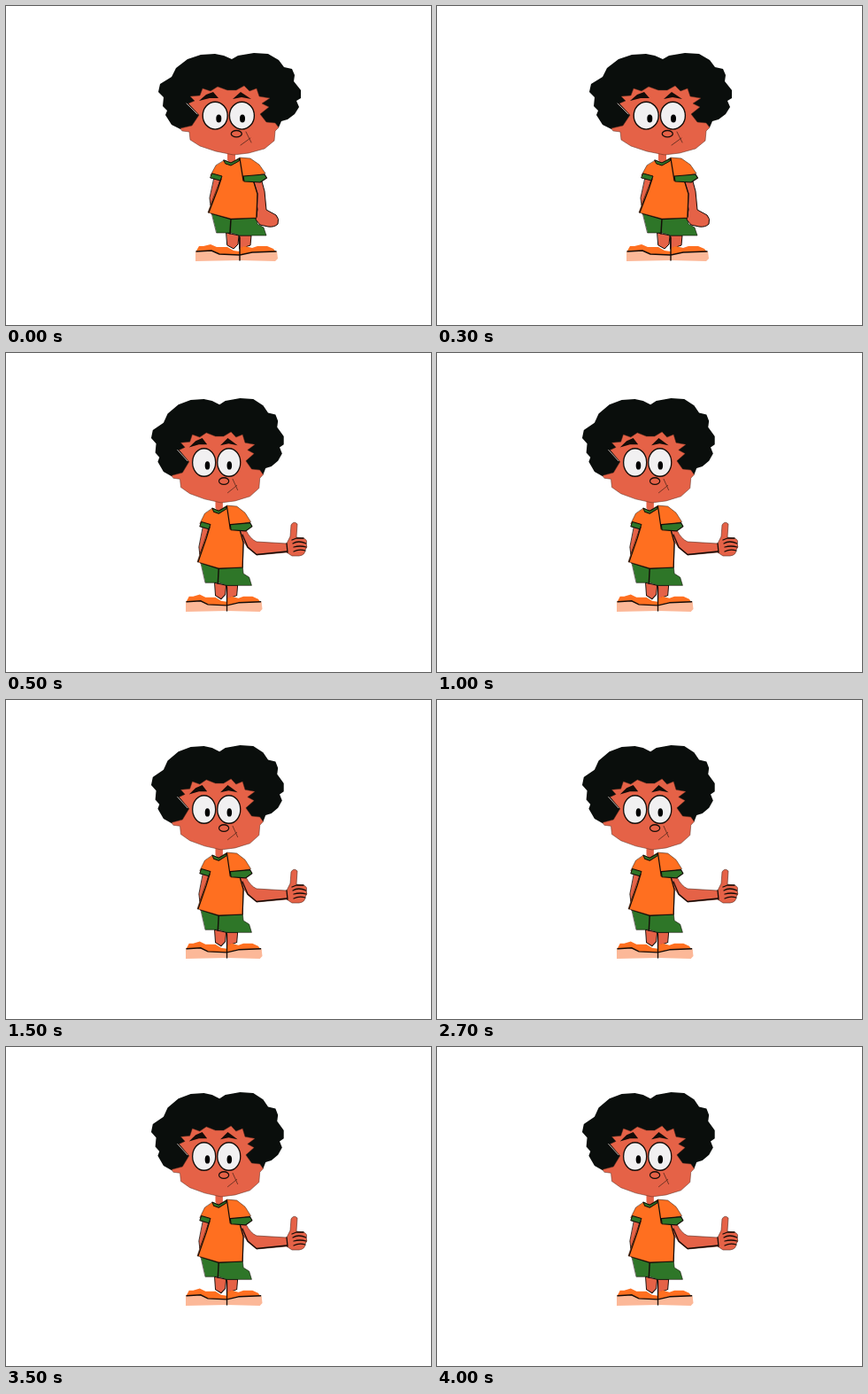
These frames come from a looping animation (480 by 360 pixels, 4500 ms). An HTML page with a canvas:

```html
<!DOCTYPE html>
<html lang="en">
<head>
<meta charset="utf-8">
<title>Thumbs up</title>
<style>
html, body { margin: 0; width: 100%; height: 100%; overflow: hidden; background: #fff; }
canvas { display: block; }
</style>
</head>
<body>
<canvas id="stage" width="480" height="360"></canvas>
<script>
const ctx = document.getElementById('stage').getContext('2d');
const LOOP = 4500, RAISE = 500;
const SKIN = '#e56247', ORANGE = '#ff6f20', GREEN = '#2e7628';
const SOLE = '#fcb898', HAIR = '#0a0e0c', INK = '#140c08', FAINT = '#54281c';

function shape(d, fill, stroke, width = 1) {
  const path = new Path2D(d);
  if (fill) { ctx.fillStyle = fill; ctx.fill(path); }
  if (stroke) { ctx.strokeStyle = stroke; ctx.lineWidth = width; ctx.stroke(path); }
}

function oval(x, y, rx, ry, fill, stroke, width) {
  const path = new Path2D();
  path.ellipse(x, y, rx, ry, 0, 0, 7);
  shape(path, fill, stroke, width);
}

function legs() {
  shape('M249 256L263 259L262 269L257 274L250 270Z', SKIN, INK);
  shape('M264 259H277L276 270L264 274Z', SKIN, INK);
  shape('M214 278L218 271L223 271L231 269L238 272L250 272L257 276L264 277V282L214 280Z', ORANGE);
  shape('M264 273L270 271L278 273L284 271L295 271L302 274L306 279L264 282Z', ORANGE);
  shape('M214 277L232 276L241 280L264 281L278 278L306 277L307 285L304 288L264 287L214 288Z', SOLE);
  shape('M215 277L232 276L241 280L264 281L278 278L305 277M264 261V287', null, INK, 1.4);
  shape('M232 232L254 240L283 238L284 246L291 250L294 259L264 259L254 256L238 256Z', GREEN, INK, .6);
  shape('M254 240L253 257M232 234L254 240.5L283 239', null, INK, 1.5);
}

function armDown() {
  shape('M279 198L289 198L292 209L294 230L305 236Q309 240 307 246Q303 250 296 249L287 247L282 241L284 230Z', SKIN, INK);
}

function armUp() {
  ctx.save();
  ctx.setTransform(1, 0, 0, 1, 0, 0);
  shape('M262 200L271 200Q276 210 283 213L317 215L321 207L322 194Q325 189 329 193L328 208L336 209Q341 211 339 215Q341 219 338 222Q338 228 331 229L323 229L317 225L283 228L273 220L266 209Z', SKIN, FAINT, .6);
  shape('M267 205L273 219L283 227.5L317 224M317 215L318 225M323 211L328 209L336 209M324 215Q330 211 339 215M325 219Q332 217 339 219M325 224Q331 221 338 223', null, INK, 1.3);
  ctx.restore();
}

function shirt() {
  shape('M235 195L242 195L239 206L231 225L230 217Z', SKIN, INK, .8);
  shape('M250 164L259 164L259 174L254 178L250 174Z', SKIN);
  shape('M247 174L254 177L264 171L276 172L286 179L293 189L268 195L280 199L284 212L283 239L254 240L228 233L238 206L243 195L231 191L237 180Z', ORANGE, INK, .5);
  shape('M233 189L244 192L242 197L231 194Z', GREEN, INK);
  shape('M268 192L292 190L294.5 194L287 199L269 198Z', GREEN, INK, 1.2);
  shape('M246 174L254 177L264 172L263 175L254 180L248 178Z', GREEN, INK);
  shape('M264 172L268 197M243 195L239 207L229 233M280 199L284 212L283 238', null, INK, 1.3);
}

function head() {
  shape('M197 139L187 134L180 123L182 118L177 113L178 103L172 97L174 88L187 80L192 70L205 60L220 55L236 54L246 56L255 60L262 56L280 53L296 54L308 61L314 69L323 71L326 78L325 85L333 95V104L328 107L331 114L326 122L318 128L311 130L308 137L290 138L250 125L212 138Z', HAIR);
  shape('M197 138L210 135L218 123L206 110L213 107L208 102L219 101L222 93L231 96L239 91L250 95L260 95L269 90L275 96L283 93L286 102L298 104L289 110L297 114L287 122L294 131L304 132L308 137L304 141L303 152L292 161L274 166L257 168L237 164L219 158L208 151L207 142L199 141Z', SKIN, FAINT, .5);
  shape('M204 110L216 122', null, '#e9d9d2', .8);
  shape('M218 107L226 100L234 97L240 104L230 104ZM256 105L265 97L277 105L266 103Z', INK);
  for (const x of [236.2, 266.4]) oval(x, 123.7, 14, 15.4, '#f1f0f1', INK, 1.4);
  oval(240.3, 127, 3, 4.6, '#000');
  oval(267, 127, 3, 4.6, '#000');
  oval(260.3, 144.2, 6, 3.7, SKIN, INK, 1.3);
  shape('M265 157L272 152L276 149M271 142L277 154', null, FAINT, .8);
}

function draw(now) {
  const raised = now % LOOP >= RAISE;
  ctx.setTransform(1, 0, 0, 1, 0, 0);
  ctx.fillStyle = '#fff';
  ctx.fillRect(0, 0, 480, 360);
  ctx.lineJoin = ctx.lineCap = 'round';
  // With the thumb up the whole body moves left, slimmer and taller.
  if (raised) ctx.setTransform(.93, 0, 0, 1.026, 4, -3.4);
  legs();
  raised ? armUp() : armDown();
  shirt();
  head();
}

const start = performance.now();
function tick() {
  draw(performance.now() - start);
  requestAnimationFrame(tick);
}
tick();
</script>
</body>
</html>
```
